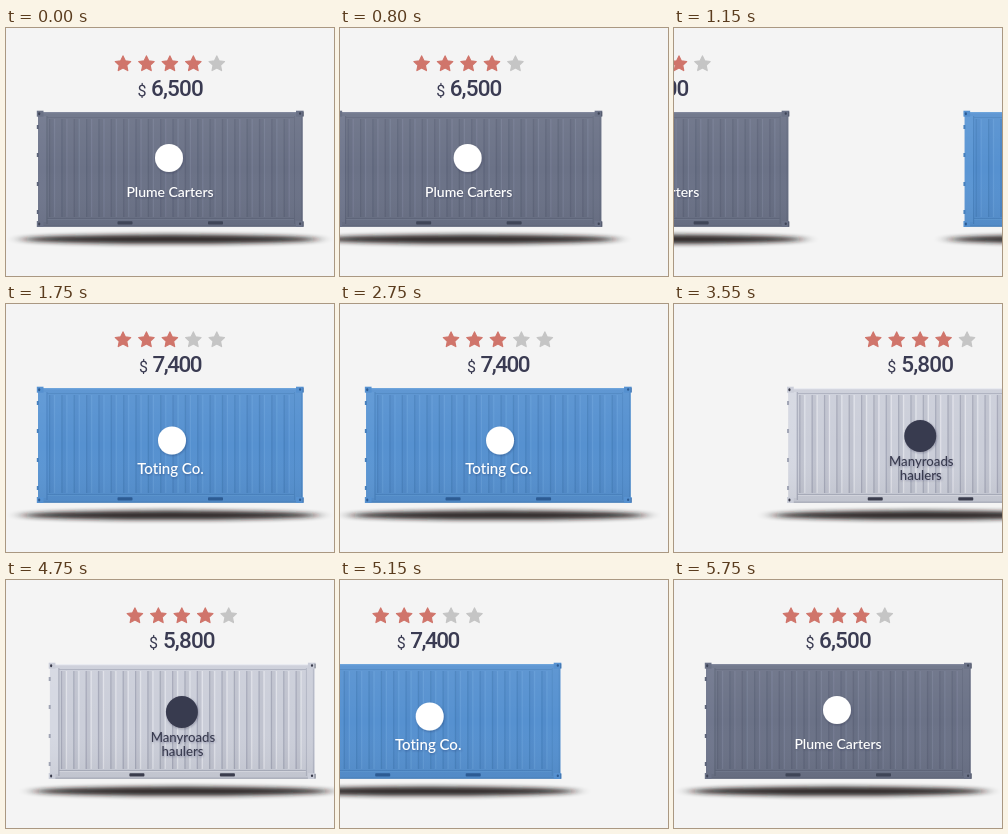
Animation, 328 px wide and 248 px high, one loop 6000 ms. Source, as an HTML page:

```html
<!DOCTYPE html>
<html lang="en">
<head>
<meta charset="utf-8">
<title>Moving quotes</title>
<style>
  html, body { margin: 0; width: 100%; height: 100%; overflow: hidden; background: #f4f4f4; }
  svg { display: block; width: 328px; height: 248px; }
  .price { font: 500 22.5px Roboto, sans-serif; fill: #3a3b52; }
  .sign { font: 400 16px Roboto, sans-serif; fill: #3a3b52; }
  .name { font-family: Lato, sans-serif; font-weight: 500; text-anchor: middle; font-variant-ligatures: none; }
</style>
</head>
<body>
<svg viewBox="0 0 328 248">
  <defs>
    <filter id="soft" x="-20%" y="-200%" width="140%" height="500%">
      <feGaussianBlur stdDeviation="8 2.1"/>
    </filter>
    <filter id="drop" x="-20%" y="-20%" width="140%" height="150%">
      <feDropShadow dx=".6" dy="1" stdDeviation=".8" flood-color="#1b2036" flood-opacity=".3"/>
    </filter>
    <linearGradient id="shade" x2="0" y2="1">
      <stop offset="0" stop-color="#fff" stop-opacity=".06"/>
      <stop offset=".5" stop-color="#fff" stop-opacity="0"/>
      <stop offset="1" stop-color="#000" stop-opacity=".05"/>
    </linearGradient>
  </defs>
  <g id="strip"></g>
</svg>
<script>
const PITCH = 441, HOLD = 750, LEG = 2000, LOOP = 6000;
const strip = document.getElementById('strip');

const slides = [
  { stars: 4, price: '6,500', px: 145, sx: 131.5, track: -.85, body: '#6b7287', dark: '#5d6479', light: '#7a8197', hole: '#3f4557',
    ink: '#fff', logo: [163, 130, 14], size: 14, lines: [['Plume Carters', 164, 169]] },
  { stars: 3, price: '7,400', px: 146.5, sx: 133, track: -1.5, body: '#5691d0', dark: '#4780bd', light: '#659fd9', hole: '#2c5b93',
    ink: '#fff', logo: [166, 136.5, 14], size: 15, lines: [['Toting Co.', 164.5, 169.5]] },
  { stars: 4, price: '5,800', px: 145, sx: 131, track: -.85, body: '#cbced9', dark: '#a0a4b4', light: '#e8eaf0', hole: '#3a3c4c',
    ink: '#393b50', logo: [164, 132, 16], size: 13.2, lines: [['Manyroads', 165, 162], ['haulers', 164.5, 176]] }
];

const rect = (x, y, w, h, fill, more = '') =>
  `<rect x="${x}" y="${y}" width="${w}" height="${h}" fill="${fill}" ${more}/>`;

function star(cx, cy, fill) {
  const pts = Array.from({ length: 10 }, (_, i) => {
    const r = i % 2 ? 3.9 : 8.1, a = Math.PI * (i / 5 - .5);
    return `${(cx + r * Math.cos(a)).toFixed(2)},${(cy + r * Math.sin(a)).toFixed(2)}`;
  });
  return `<polygon points="${pts.join(' ')}" fill="${fill}" stroke="${fill}" stroke-width="1.2" stroke-linejoin="round"/>`;
}

function container({ body, dark, light, hole }) {
  let s = '<ellipse cx="164" cy="211.2" rx="149" ry="4.6" fill="#1d1917" opacity=".9" filter="url(#soft)"/>';
  s += rect(32, 84, 264.8, 114.5, body);
  s += rect(36, 84, 256, 1.2, light) + rect(41, 89, 247, 1, dark, 'opacity=".7"');
  for (let i = 0; i < 20; i++) {
    const x = 43 + i * 12.35;
    s += rect(x, 91, 4.5, 98, dark, 'opacity=".25" rx="1"');
    s += rect(x, 91, 1.2, 98, dark, 'opacity=".85"');
    s += rect(x + 5, 91, 1.2, 98, light, 'opacity=".7"');
  }
  s += rect(41, 190, 247, 1, dark, 'opacity=".7"') + rect(41, 191, 247, 1, light, 'opacity=".5"');
  s += rect(32, 197.7, 264.8, 1, dark);
  s += rect(32, 88, 8.5, 106, light, 'opacity=".35"');
  s += rect(40.5, 88, 1, 108, dark) + rect(288, 88, 1, 108, dark, 'opacity=".6"');
  s += rect(295, 88, 1, 106, dark, 'opacity=".6"');
  s += rect(32, 84, 264.8, 114.5, 'url(#shade)');
  for (const x of [111.5, 202]) s += rect(x, 193.2, 15, 3.4, hole, 'rx=".8"');
  for (const y of [97, 125, 154, 182]) s += rect(30.8, y, 2, 4, dark);
  for (const y of [82.7, 193]) {
    s += rect(30.8, y, 6.7, 6, body) + rect(290, y, 7.6, 6, body);
    s += rect(32.2, y + 1.5, 2, 3, hole, 'rx="1"') + rect(293, y + 1.5, 2.2, 2.6, hole, 'rx="1"');
    s += rect(296.7, y + 1, .9, 4.5, hole, 'opacity=".7"');
  }
  return s;
}

function slide(d, i) {
  let s = container(d);
  for (let n = 0; n < 5; n++) s += star(117 + n * 23.45, 36, n < d.stars ? '#d0756b' : '#c5c5c5');
  s += `<text class="sign" x="${d.sx}" y="67.6">$</text>`;
  s += `<text class="price" letter-spacing="${d.track}" x="${d.px}" y="67.7">${d.price}</text>`;
  const [cx, cy, r] = d.logo;
  s += `<g fill="${d.ink}" filter="url(#drop)"><circle cx="${cx}" cy="${cy}" r="${r}"/>`;
  for (const [text, x, y] of d.lines) s += `<text class="name" font-size="${d.size}" x="${x}" y="${y}">${text}</text>`;
  return `<g transform="translate(${i * PITCH})">${s}</g></g>`;
}

strip.innerHTML = slides.map(slide).join('');

// Linear slide of one second at 15 steps per second, on a 50 ms clock.
function scroll(t) {
  const leg = Math.floor(t / LEG);
  const s = Math.floor((t % LEG) / 50) * 50 - HOLD;
  const p = s < 0 ? 0 : Math.min(1, Math.floor((s + 40) * .015) / 15 + .0135);
  const to = (leg + 1) % 3;
  return PITCH * (leg + (to - leg) * p);
}

let start;
function draw(now) {
  start ??= now;
  strip.setAttribute('transform', `translate(${-scroll((now - start) % LOOP).toFixed(2)})`);
  requestAnimationFrame(draw);
}
requestAnimationFrame(draw);
</script>
</body>
</html>
```
